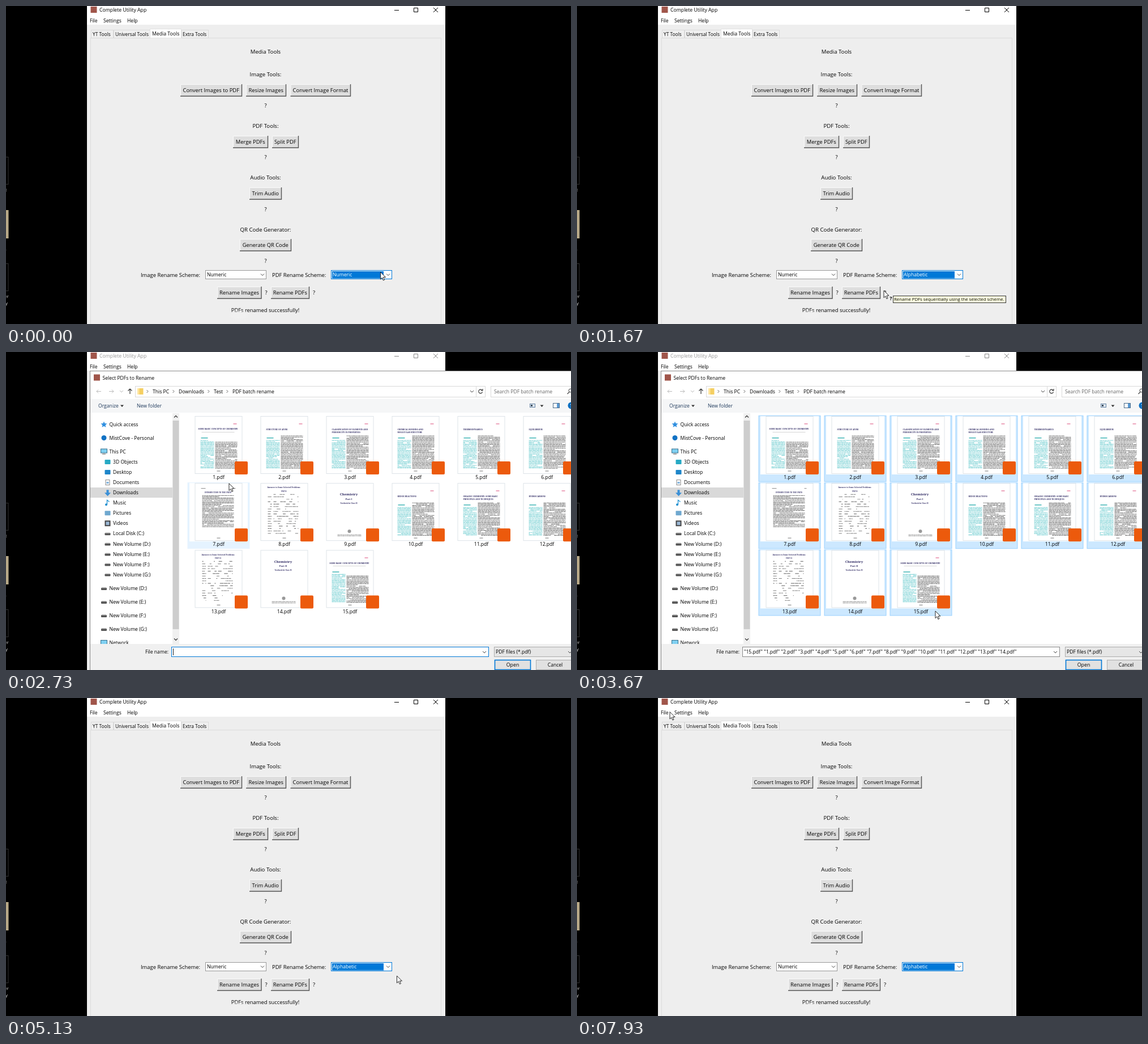
Animation of 998 by 561 pixels, one loop 8 s. Source, as an HTML page:

```html
<!DOCTYPE html>
<html lang="en">
<head>
<meta charset="utf-8">
<title>Batch rename</title>
<style>
html,body{margin:0;width:100%;height:100%;overflow:hidden;background:#000}
svg{display:block;width:100vw;height:100vh;font-family:"Open Sans","Noto Sans",sans-serif}
text{white-space:pre}
</style>
</head>
<body>
<svg id="stage" viewBox="0 0 998 561"></svg>
<script>
const LOOP = 8000;
const BLUE = '#0078d7';

// ---------- drawing helpers ----------
const rect = (x, y, w, h, fill, extra = '') =>
  `<rect x="${x}" y="${y}" width="${w}" height="${h}" fill="${fill}" ${extra}/>`;
const box = (x, y, w, h, fill, stroke, extra = '') =>
  rect(x + .5, y + .5, w - 1, h - 1, fill, `stroke="${stroke}" ${extra}`);
const line = (d, stroke, w = 1, extra = '') =>
  `<path d="${d}" fill="none" stroke="${stroke}" stroke-width="${w}" ${extra}/>`;
const fillPath = (d, fill, extra = '') => `<path d="${d}" fill="${fill}" ${extra}/>`;
const text = (x, y, str, size = 8.6, extra = '') =>
  `<text x="${x}" y="${(y + size * .36).toFixed(2)}" font-size="${size}" ${extra}>${str}</text>`;
const mid = (x, y, str, size = 9.5, extra = '') =>
  text(x, y, str, size, 'text-anchor="middle" ' + extra);
const chevron = (x, y, color = '#444') => line(`M${x - 3} ${y - 1.5}l3 3l3 -3`, color);
const crumb = (x, y) => line(`M${x - 1.5} ${y - 2.5}l2.5 2.5l-2.5 2.5`, '#555', .9);
const caretDown = (x, y) => fillPath(`M${x - 3} ${y - 1.5}h6l-3 3.5z`, '#333');
const group = (id, body) => `<g id="${id}">${body}</g>`;

function random(seed) {
  return () => (seed = (seed * 16807) % 2147483647) / 2147483647;
}

// ---------- main window ----------
function button(x, y, w, label) {
  const h = 21;
  return rect(x, y, w, h, '#dedede') +
    line(`M${x + .5} ${y + h}V${y + .5}H${x + w}`, '#fafafa') +
    line(`M${x} ${y + h}H${x + w}V${y}`, '#555', 1.4) +
    mid(x + w / 2, y + 10.5, label, 9.4);
}

function desktop() {
  return box(-10, 266, 14.5, 49, '#000', '#333') +
    rect(0, 360, 4.5, 50, '#b8a988') +
    box(-10, 454, 14.5, 49, '#000', '#333') +
    ['t', '.'].map((s, i) => text(-1, 324 + i * 104, s, 7.5, 'fill="#aaa"')).join('') +
    text(-3, 512, 'er', 8, 'fill="#ddd"') + text(-1, 524, 'y', 8, 'fill="#ddd"');
}

function mainWindow() {
  const tabs = [[150, 40, 'YT Tools', 153], [190, 65, 'Universal Tools', 193], [310, 48, 'Extra Tools', 312]];
  const labels = [[81, 'Media Tools'], [121, 'Image Tools:'], [212, 'PDF Tools:'],
    [303, 'Audio Tools:'], [394.5, 'QR Code Generator:']];
  return rect(143, 0, 633, 561, '#eeeeee') + rect(143, 0, 633, 33, '#fff') +
    rect(149.5, 1, 11, 11, '#a0554a') +
    group('caption',
      text(165, 7, 'Complete Utility App', 8.7) +
      line('M686 7.5h8M720.5 3.5h7v7h-7zM755 3l8 8M763 3l-8 8', 'currentColor')) +
    text(148, 26, 'File') + text(172, 26, 'Settings') + text(214, 26, 'Help') +
    box(149, 56, 620, 520, '#eeeeee', '#dcdcdc') +
    tabs.map(([x, w, s, tx]) => box(x, 42, w, 15, '#f0f0f0', '#d9d9d9') + text(tx, 49.5, s, 8.4)).join('') +
    box(254, 40, 56, 17, '#fff', '#e2e2e2') + text(258, 48.5, 'Media Tools', 8.7) +
    labels.map(([y, s]) => mid(458.5, y, s, 9.6)).join('') +
    [176, 267, 358.5, 449.5].map(y => mid(458.5, y, '?')).join('') +
    button(308, 138, 108.5, 'Convert Images to PDF') + button(424, 138, 70.5, 'Resize Images') +
    button(502.5, 138, 106, 'Convert Image Format') +
    button(401, 229, 61.5, 'Merge PDFs') + button(470, 229, 46.5, 'Split PDF') +
    button(430, 320, 56.5, 'Trim Audio') + button(413, 411, 90.5, 'Generate QR Code') +
    text(238, 474.5, 'Image Rename Scheme:', 9.4) + text(470, 474.5, 'PDF Rename Scheme:', 9.4) +
    box(352, 466, 108, 16, '#fff', '#999') + text(355, 474, 'Numeric') + chevron(453, 474) +
    box(574, 466, 108, 16, '#fff', '#999', 'id="comboBox"') +
    rect(576, 468, 91, 12.5, BLUE, 'id="comboMark"') +
    text(577, 474, '', 8.6, 'id="comboText"') + chevron(675, 474) +
    button(373, 495, 78, 'Rename Images') + mid(459.5, 505.5, '?') +
    button(468, 495, 67.5, 'Rename PDFs') + mid(544, 505.5, '?') +
    mid(458, 537, 'PDFs renamed successfully!', 9.4) +
    `<ellipse cx="412" cy="546" rx="15" ry="8" fill="#f1f1f1" opacity=".75" filter="url(#soft)"/>`;
}

function tooltip() {
  return box(558, 511, 200, 13, '#ffffe0', '#333') +
    text(560, 517.5, 'Rename PDFs sequentially using the selected scheme.', 7.75);
}

// ---------- file dialog ----------
function sidebar() {
  const drive = (x, y) => rect(x - 5, y - 1, 10, 4, '#555', 'rx="1"') + rect(x - 4, y - 2, 8, 1.5, '#bbb');
  const tile = color => (x, y) => rect(x - 5, y - 4, 10, 8, color, 'rx="1"');
  const note = (x, y) => line(`M${x - 1} ${y + 3}v-8l4 3`, '#1b8fd0', 1.3) +
    `<circle cx="${x - 2.5}" cy="${y + 3}" r="2" fill="#1b8fd0"/>`;
  const arrow = (x, y) => fillPath(`M${x - 2} ${y - 5}h4v5h3.5l-5.5 6l-5.5 -6h3.5z`, '#3a8fd6');
  const star = (x, y) => fillPath(`M${x} ${y - 5}l1.5 3.5l4 .3l-3 2.6l1 3.8l-3.5 -2l-3.5 2l1 -3.8l-3 -2.6l4 -.3z`, '#2f8fe0');
  const dot = (x, y) => `<circle cx="${x}" cy="${y}" r="4.5" fill="#1272c4"/>`;
  const pc = (x, y) => box(x - 6, y - 5, 12, 8, '#7fd0f2', '#38708c') + rect(x - 3, y + 4, 6, 1, '#555');
  const paper = (x, y) => box(x - 4, y - 5, 8, 10, '#fff', '#888') + rect(x - 2, y - 1, 4, 3, '#7ab0dd');
  const film = (x, y) => rect(x - 5, y - 5, 10, 10, '#444') + rect(x - 3, y - 3, 6, 6, '#9bb8d6');
  const volumes = ['D', 'E', 'F', 'G'].map(c => [`New Volume (${c}:)`, drive]);
  const top = [['Quick access', star], ['MistCove - Personal', dot], ['This PC', pc]];
  const inner = [['3D Objects', tile('#27a9c4')], ['Desktop', tile('#1e86c9')], ['Documents', paper],
    ['Downloads', arrow], ['Music', note], ['Pictures', tile('#6fa8cf')], ['Videos', film],
    ['Local Disk (C:)', drive], ...volumes];
  const rows = (list, x, y, step) => list.map(([s, icon], i) =>
    icon(x - 9.5, y + i * step) + text(x, y + i * step, s)).join('');
  return rect(149, 239, 145, 18, '#d9d9d9') +
    rows(top, 182.5, 127.5, 24) + rows(inner, 189, 194, 18.05) +
    rows([...volumes, ['Network', pc]], 182.5, 417, 24);
}

function scribble(rnd, x, y, w, rows, color, gap = 2.2, density = .97) {
  let d = '';
  for (let i = 0; i < rows; i++) {
    const end = x + w * (rnd() < .1 ? .5 + rnd() * .4 : 1);
    for (let p = x; p < end;) {
      const len = Math.min(1.5 + rnd() * 5, end - p);
      if (rnd() < density) d += `M${p.toFixed(1)} ${(y + i * gap).toFixed(1)}h${len.toFixed(1)}`;
      p += len + .6;
    }
  }
  return line(d, color, 1.1, 'opacity=".68"');
}

const serif = 'font-family="Noto Serif,serif" font-weight="bold" fill="#2f2a63"';
const titles = {
  1: 'SOME BASIC CONCEPTS OF CHEMISTRY', 2: 'STRUCTURE OF ATOM',
  3: 'CLASSIFICATION OF ELEMENTS AND|PERIODICITY IN PROPERTIES',
  4: 'CHEMICAL BONDING AND|MOLECULAR STRUCTURE', 5: 'THERMODYNAMICS', 6: 'EQUILIBRIUM',
  10: 'REDOX REACTIONS', 11: 'ORGANIC CHEMISTRY: SOME BASIC|PRINCIPLES AND TECHNIQUES',
  12: 'HYDROCARBONS', 15: 'SOME BASIC CONCEPTS OF CHEMISTRY'
};

// Page contents, relative to the page's top left corner
function page(n) {
  const rnd = random(n * 7919 + 13);
  const footer = rect(39, 96.5, 6, 1, '#777');
  if (n === 9 || n === 14) {
    return mid(40, 20, 'Chemistry', 6, serif) + mid(40, 28.5, n === 9 ? 'Part I' : 'Part II', 4.2, serif) +
      mid(40, 35.5, 'Textbook for Class XI', 2.8, serif) +
      `<circle cx="41" cy="85" r="3" fill="#999"/>` + scribble(rnd, 20, 91, 42, 2, '#777', 2.2);
  }
  if (n === 7) {
    return rect(11, 9, 8, 1, '#888') + rect(68, 9, 4, 1, '#888') + mid(41, 17, 'INTRODUCTION TO THE UNITS', 3, serif) +
      scribble(rnd, 13, 22, 56, 26, '#333') + footer;
  }
  if (n === 8 || n === 13) {
    return mid(41, 8, 'Answers to Some Selected Problems', 3.2, serif) + mid(41, 15, 'UNIT ' + n, 2.8, serif) +
      scribble(rnd, 13, 20, 7, 17, '#444', 4.3, .6) + scribble(rnd, 23, 20, 44, 17, '#444', 4.3, .5) + footer;
  }
  const rows = titles[n].split('|');
  const wide = n === 1 || n === 15;
  return rect(68, 13, 6, 1.5, '#e889a8') +
    rows.map((s, i) => wide ? mid(41, 23, s, 3.5, serif) : text(10, 24 + i * 5, s, 3.4, serif)).join('') +
    (wide ? rect(12, 28, 58, .6, '#bbb') : '') +
    scribble(rnd, 10, 43, 24, 23, '#35b9bd') + rect(11, 38, 12, 1.3, '#2aa') +
    scribble(rnd, 36, wide ? 46 : 35, 39, wide ? 22 : 27, '#333') + footer;
}

// Each file: tile, square white thumbnail with the page inside, badge in its corner
function files() {
  let out = '';
  for (let i = 0; i < 15; i++) {
    const cx = 375.5 + (i % 6) * 116, y = 112 + Math.floor(i / 6) * 118.2;
    out += box(cx - 55, y, 110, 117, '#cce8ff', '#99d1ff', 'class="tile"') +
      rect(cx - 51.5, y + 1, 103, 103, '#fff') +
      box(cx - 42, y + 1, 84, 102, '#fff', '#dde3e8') +
      `<g transform="translate(${cx - 42} ${y + 1})">${page(i + 1)}</g>` +
      rect(cx + 28.5, y + 81, 23, 23, '#ec5a0c', 'rx="2"') +
      mid(cx, y + 109, `${i + 1}.pdf`, 8.6);
  }
  return out;
}

function dialog() {
  const crumbs = [[259, 'This PC'], [305, 'Downloads'], [367, 'Test'], [400, 'PDF batch rename']];
  return box(148, 33, 868, 534, '#fff', '#8c8c8c') +
    rect(155, 39.5, 11, 11, '#a0554a') + text(170.5, 45.5, 'Select PDFs to Rename') +
    line('M1003 41l8 8M1011 41l-8 8', '#222') +
    line('M168 69.5h-8m3 -3l-3 3l3 3M182 69.5h8m-3 -3l3 3l-3 3', '#bbb') + chevron(204, 69.5, '#bbb') +
    line('M219 74v-9m-3.5 3.5l3.5 -3.5l3.5 3.5', '#333', 1.2) +
    box(228, 60, 619, 20, '#fff', '#d9d9d9') + line('M830.5 60v20', '#d9d9d9') +
    rect(232.5, 64, 10, 11, '#f5cf62') + rect(232.5, 64, 3, 11, '#ffe49a') +
    crumbs.map(([x, s]) => crumb(x - 9, 69.5) + text(x, 69.5, s)).join('') +
    chevron(823, 69.5) + line('M841 67.5a3.4 3.4 0 1 0 .5 3M842 65v3h-3', '#333', 1.1) +
    box(856, 60, 152, 20, '#fff', '#d9d9d9') + text(862, 69.5, 'Search PDF batch rename', 8.6, 'fill="#666"') +
    `<circle cx="997" cy="68" r="3" fill="none" stroke="#444"/>` + line('M995 70.5l-3.5 3.5', '#444', 1.3) +
    rect(149, 83, 866, 24, '#f5f6f7') +
    text(163, 94.5, 'Organize', 8.6, 'fill="#1e395b"') + caretDown(205, 95) +
    text(231, 94.5, 'New folder', 8.6, 'fill="#1e395b"') +
    box(925, 91, 10, 7, '#dfeaf5', '#6884a3') + rect(927, 93, 3, 3, '#345') + caretDown(946.5, 95) +
    box(966, 90, 12, 9, '#fff', '#4a6b8a') + rect(973, 91, 4, 7, '#5b9bd5') +
    `<circle cx="998.5" cy="94.5" r="6" fill="#0a6fc2"/>` + mid(998.5, 94.5, '?', 8.5, 'fill="#fff" font-weight="bold"') +
    sidebar() +
    rect(294, 108, 12, 407, '#f0f0f0') + rect(294.5, 121, 11, 368, '#cdcdcd') +
    line('M297 115.5l3 -3l3 3', '#444', 1.4) + line('M297 505.5l3 3l3 -3', '#444', 1.4) +
    files() +
    rect(149, 515, 866, 51, '#f0f0f0') +
    text(287, 529, 'File name:', 8.6, 'text-anchor="end"') +
    box(292, 520, 561, 18, '#fff', '#8a8a8a', 'id="nameBox"') +
    text(295, 529, '', 8.6, 'id="nameText"') + rect(295, 523, 1, 12, '#222', 'id="nameCaret"') + chevron(845, 529.5) +
    box(862, 520, 143, 18, '#e6e6e6', '#adadad') + text(865, 529, 'PDF files (*.pdf)') + chevron(996, 529.5) +
    box(863, 543, 64, 18, '#e1e1e1', BLUE, 'stroke-width="1.6"') + mid(895, 552, 'Open', 8.8) +
    box(936, 543, 72, 18, '#e1e1e1', '#adadad') + mid(970, 552, 'Cancel', 8.6);
}

const pointer =
  fillPath('M0 0v12.6l2.9 -2.8l2 4.7l2.1 -.9l-2 -4.6h4z', '#fff', 'stroke="#111" stroke-width=".9"') +
  group('helpMark', mid(12.5, 13.5, '?', 9, 'font-weight="bold"'));

const stage = document.getElementById('stage');
stage.innerHTML = '<defs><filter id="soft"><feGaussianBlur stdDeviation="2.5"/></filter></defs>' +
  rect(0, 0, 998, 561, '#000') + desktop() + mainWindow() + group('tip', tooltip()) +
  group('dialog', dialog()) + group('pointer', pointer);

// ---------- motion ----------
const el = {};
stage.querySelectorAll('[id]').forEach(node => el[node.id] = node);
const tiles = [...stage.querySelectorAll('.tile')];
const show = (node, on) => node.setAttribute('display', on ? 'inline' : 'none');

const time = { pick: 700, tipOn: 1400, tipOff: 1840, open: 2200, first: 2870, all: 3480, close: 4320 };
const OPENING = 240, CLOSING = 165;

// Pointer stops: time, x, y
const stops = [[0, 661.5, 469.5], [350, 661, 471], [700, 625, 492], [1350, 542, 502], [1750, 542, 502],
  [2000, 503, 506], [2150, 500, 504], [2330, 469, 443], [2480, 462, 430], [2850, 372, 168], [2950, 372, 170],
  [3450, 632, 456], [3700, 633, 457], [4200, 884, 557], [4480, 884, 559.5], [5150, 690, 490],
  [6000, 484, 422], [6500, 484, 422], [7850, 164, 24.5], [8000, 164, 24.5]];

function pointerAt(t) {
  const i = stops.findIndex(s => s[0] > t);
  const [t0, x0, y0] = stops[i - 1], [t1, x1, y1] = stops[i];
  const p = (t - t0) / (t1 - t0), k = p * p * (3 - 2 * p);
  return [x0 + (x1 - x0) * k, y0 + (y1 - y0) * k];
}

const quoted = [15, ...Array.from({ length: 14 }, (_, i) => i + 1)].map(n => `"${n}.pdf"`).join(' ');
const clamp = v => Math.max(0, Math.min(1, v));

function hovered(x, y) {
  const col = Math.floor((x - 320.5) / 116), row = Math.floor((y - 112) / 118.2);
  return col < 0 || col > 5 || row < 0 || row > 2 ? -1 : row * 6 + col;
}

function drawDialog(t, x, y) {
  const on = t >= time.open && t < time.close + CLOSING;
  show(el.dialog, on);
  if (!on) return;
  const opening = clamp((t - time.open) / OPENING), closing = clamp((t - time.close) / CLOSING);
  const scale = 1 - .08 * (1 - opening) ** 2.5 - .048 * closing;
  const alpha = (1 - (1 - opening) ** 1.6) * (1 - closing);
  el.dialog.setAttribute('transform', `translate(577 290) scale(${scale}) translate(-577 -290)`);
  el.dialog.setAttribute('opacity', alpha);

  const all = t >= time.all, one = t >= time.first;
  const over = hovered(x, y);
  tiles.forEach((tile, i) => {
    const chosen = all || (one && i === 0);
    show(tile, chosen || i === over);
    tile.setAttribute('fill', chosen ? '#cce8ff' : '#e5f3ff');
    tile.setAttribute('stroke', chosen ? '#99d1ff' : '#e5f3ff');
  });
  el.nameText.textContent = all ? quoted : one ? '1.pdf' : '';
  el.nameBox.setAttribute('stroke', one ? '#8a8a8a' : BLUE);
  show(el.nameCaret, !one);
}

function draw(t) {
  const [x, y] = pointerAt(t);
  const active = t < time.open || t >= time.close;
  el.caption.setAttribute('fill', active ? '#000' : '#999');
  el.caption.setAttribute('color', active ? '#000' : '#888');
  el.comboBox.setAttribute('stroke', active ? BLUE : '#999');
  show(el.comboMark, active);
  el.comboText.setAttribute('fill', active ? '#fff' : '#000');
  el.comboText.textContent = t < time.pick ? 'Numeric' : 'Alphabetic';
  const tip = t >= time.tipOn && t < time.tipOff;
  show(el.tip, tip);
  show(el.helpMark, tip);
  drawDialog(t, x, y);
  el.pointer.setAttribute('transform', `translate(${x} ${y})`);
}

const start = performance.now();
function tick() {
  draw((performance.now() - start) % LOOP);
  requestAnimationFrame(tick);
}
tick();
</script>
</body>
</html>
```
